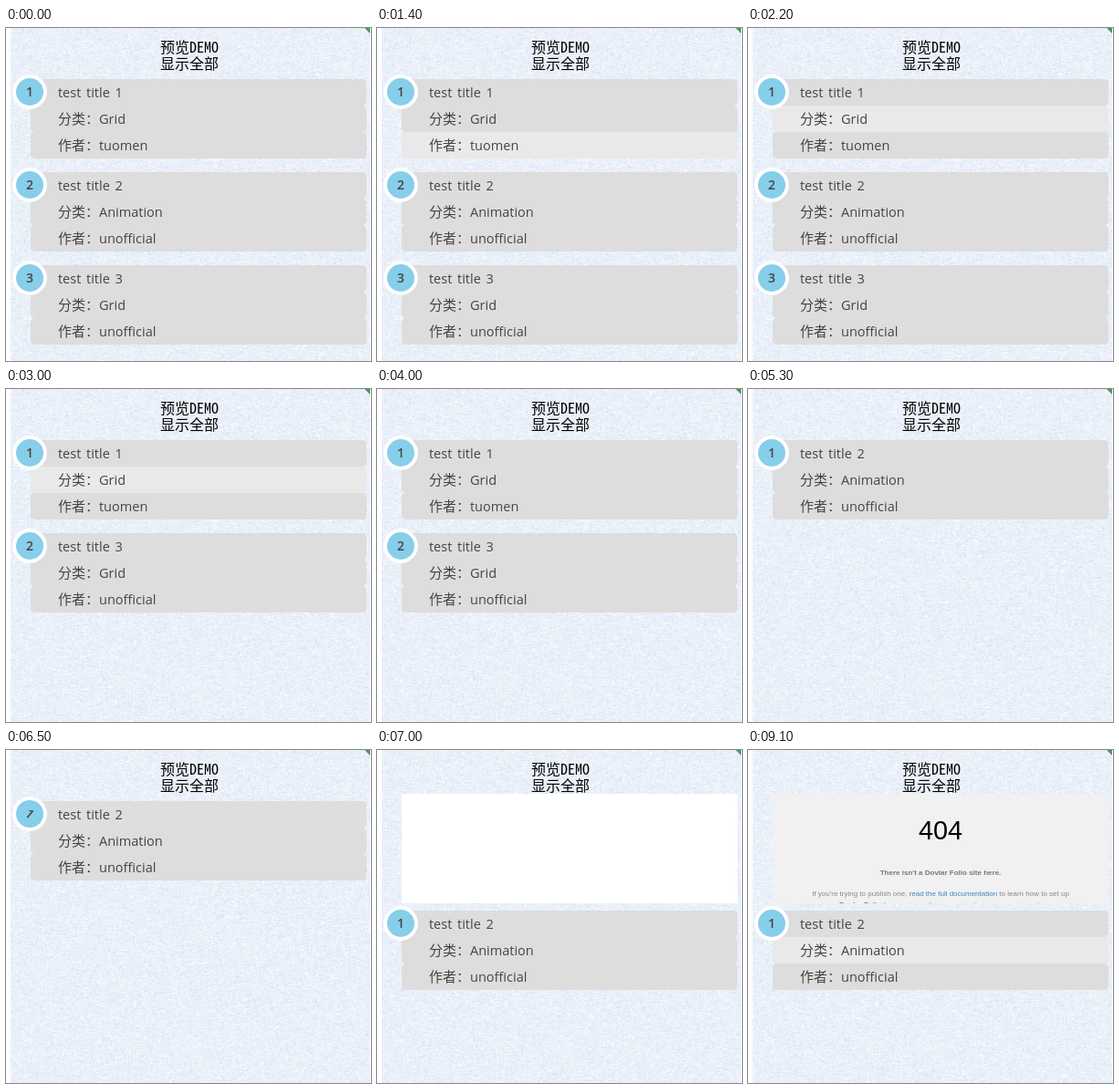
Write an HTML page with a canvas that moves like this. It is 400 px wide and 365 px high and loops after 10 s.

```html
<!DOCTYPE html>
<html lang="zh">
<head>
<meta charset="utf-8">
<title>预览DEMO</title>
<style>
html, body { margin: 0; width: 100%; height: 100%; overflow: hidden; background: #fff; }
canvas { display: block; }
</style>
</head>
<body>
<canvas id="stage" width="400" height="365"></canvas>
<script>
const W = 400, H = 365, LOOP = 10000, TICK = 100;
const ctx = document.getElementById('stage').getContext('2d');

const CJK = '"Noto Sans CJK SC", "Noto Sans CJK", sans-serif';
const CJK_MONO = '"Noto Sans Mono CJK SC", "Noto Sans CJK SC", monospace';
const BODY = '"Open Sans", "Noto Sans", sans-serif';
const ARIAL = '"Liberation Sans", Arial, sans-serif';

const ITEMS = {
  1: ['Grid', 'tuomen'],
  2: ['Animation', 'unofficial'],
  3: ['Grid', 'unofficial']
};

// Visible items from a given time on
const FILTERS = [
  [0, [1, 2, 3]],
  [3000, [1, 3]],
  [4300, [1, 2, 3]],
  [5300, [2]]
];
const PREVIEW_AT = 7000, LOADED_AT = 8300;

// Hovers: item, row, fade in from/to, fade out from/to
const HOVERS = [
  [1, 2, 500, 700, 1400, 1700],
  [1, 1, 1400, 1600, 1600, 1900],
  [1, 0, 1600, 1900, 2000, 2200],
  [1, 1, 2000, 2200, 3700, 4000],
  [1, 0, 3700, 3900, 3800, 4000],
  [1, 0, 4500, 4700, 4600, 4800],
  [2, 0, 4600, 4800, 4700, 4900],
  [2, 1, 4700, 4900, 5300, 5300],
  [2, 0, 6200, 6400, 6300, 6600],
  [2, 1, 8900, 9100, LOOP, LOOP]
];

function ramp(t, from, to) {
  if (t >= to) return 1;
  if (t <= from) return 0;
  const left = 1 - (t - from) / (to - from);
  return 1 - left * left;
}

function hoverLevel(id, row, t) {
  let level = 0;
  for (const [i, r, a, b, c, d] of HOVERS) {
    if (i === id && r === row) level = Math.max(level, ramp(t, a, b) * (1 - ramp(t, c, d)));
  }
  return level;
}

function text(str, x, y, font, color, align = 'left') {
  ctx.font = font;
  ctx.fillStyle = color;
  ctx.textAlign = align;
  ctx.fillText(str, x, y);
}

// Woven paper: tiny pale threads in both directions
function makePaper() {
  const paper = document.createElement('canvas');
  paper.width = W;
  paper.height = H;
  const p = paper.getContext('2d');
  let seed = 11;
  const rand = n => {
    seed = (seed * 16807) % 2147483647;
    return Math.floor(seed / 2147483647 * n);
  };
  p.fillStyle = '#fff';
  p.fillRect(0, 0, W, H);
  p.beginPath();
  p.rect(5, 0, 394, H);
  p.clip();
  p.fillStyle = '#eaf0f9';
  p.fillRect(0, 0, W, H);
  for (let i = 0; i < 40000; i++) {
    p.fillStyle = i % 2 ? 'rgba(255,255,255,.35)' : 'rgba(206,219,240,.28)';
    const len = 1 + rand(4), x = rand(W), y = rand(H);
    if (i % 3) p.fillRect(x, y, len, 1);
    else p.fillRect(x, y, 1, len);
  }
  p.fillStyle = '#4a9a55';
  p.beginPath();
  p.moveTo(393, 0);
  p.lineTo(399, 0);
  p.lineTo(399, 6);
  p.fill();
  return paper;
}
const paper = makePaper();

function drawHeader() {
  text('预览DEMO', 169, 27, '16px ' + CJK_MONO, '#000');
  text('显示全部', 169, 45, '16px ' + CJK_MONO, '#000');
}

function drawRow(id, row, y, t) {
  const shade = Math.round(221 + 12 * hoverLevel(id, row, t));
  ctx.fillStyle = `rgb(${shade},${shade},${shade})`;
  ctx.beginPath();
  ctx.roundRect(27, y, 368, 29, 4.5);
  ctx.fill();
  const font = '14.5px ' + BODY;
  if (row === 0) {
    ctx.wordSpacing = '2px';
    text('test title ' + id, 57, y + 20, font, '#444');
    ctx.wordSpacing = '0px';
  } else {
    text(row === 1 ? '分类：' : '作者：', 57, y + 20, '300 15px ' + CJK, '#444');
    text(ITEMS[id][row - 1], 102, y + 20, font, '#444');
  }
}

function disc(r, color) {
  ctx.fillStyle = color;
  ctx.beginPath();
  ctx.arc(0, 0, r, 0, Math.PI * 2);
  ctx.fill();
}

function drawBadge(n, y, turn) {
  ctx.save();
  ctx.translate(26, y);
  ctx.rotate(turn * Math.PI * 2);
  disc(18.9, '#fff');
  disc(15, '#87ceeb');
  text(n, 0, 5, '600 14px ' + BODY, '#444', 'center');
  ctx.restore();
}

// One centred line made of [string, colour, weight] pieces
function drawLine(parts, y) {
  const fontOf = part => (part[2] || 'normal') + ' 8px ' + ARIAL;
  const widths = parts.map(part => {
    ctx.font = fontOf(part);
    return ctx.measureText(part[0]).width;
  });
  let x = 211 - widths.reduce((a, b) => a + b) / 2;
  parts.forEach((part, i) => {
    text(part[0], x, y, fontOf(part), part[1]);
    x += widths[i];
  });
}

function drawPreview(loaded) {
  ctx.save();
  ctx.beginPath();
  ctx.rect(27, 48, 368, 120);
  ctx.clip();
  ctx.fillStyle = loaded ? '#f1f1f1' : '#fff';
  ctx.fillRect(27, 48, 368, 120);
  if (loaded) {
    const grey = '#888';
    text('404', 211, 98, '28.8px ' + ARIAL, '#000', 'center');
    drawLine([["There isn't a Dovlar Folio site here.", '#777', 'bold']], 137);
    drawLine([
      ["If you're trying to publish one, ", grey],
      ['read the full documentation', '#4183c4'],
      [' to learn how to set up', grey]
    ], 160);
    drawLine([
      ['Dovlar Folio', '#777', 'bold'],
      [' for your repository, organization, or user account.', grey]
    ], 172);
  }
  ctx.restore();
}

function draw(t) {
  ctx.drawImage(paper, 0, 0);
  drawHeader();
  const preview = t >= PREVIEW_AT;
  if (preview) drawPreview(t >= LOADED_AT);
  const shown = FILTERS.filter(f => t >= f[0]).pop()[1];
  shown.forEach((id, i) => {
    const top = (preview ? 176 : 56) + i * 102;
    for (let row = 0; row < 3; row++) drawRow(id, row, top + row * 29, t);
    drawBadge(i + 1, top + 14, hoverLevel(id, 0, t));
  });
}

const start = performance.now();
function frame() {
  const t = (performance.now() - start) % LOOP;
  draw(Math.floor(t / TICK) * TICK);
  requestAnimationFrame(frame);
}
frame();
</script>
</body>
</html>
```
